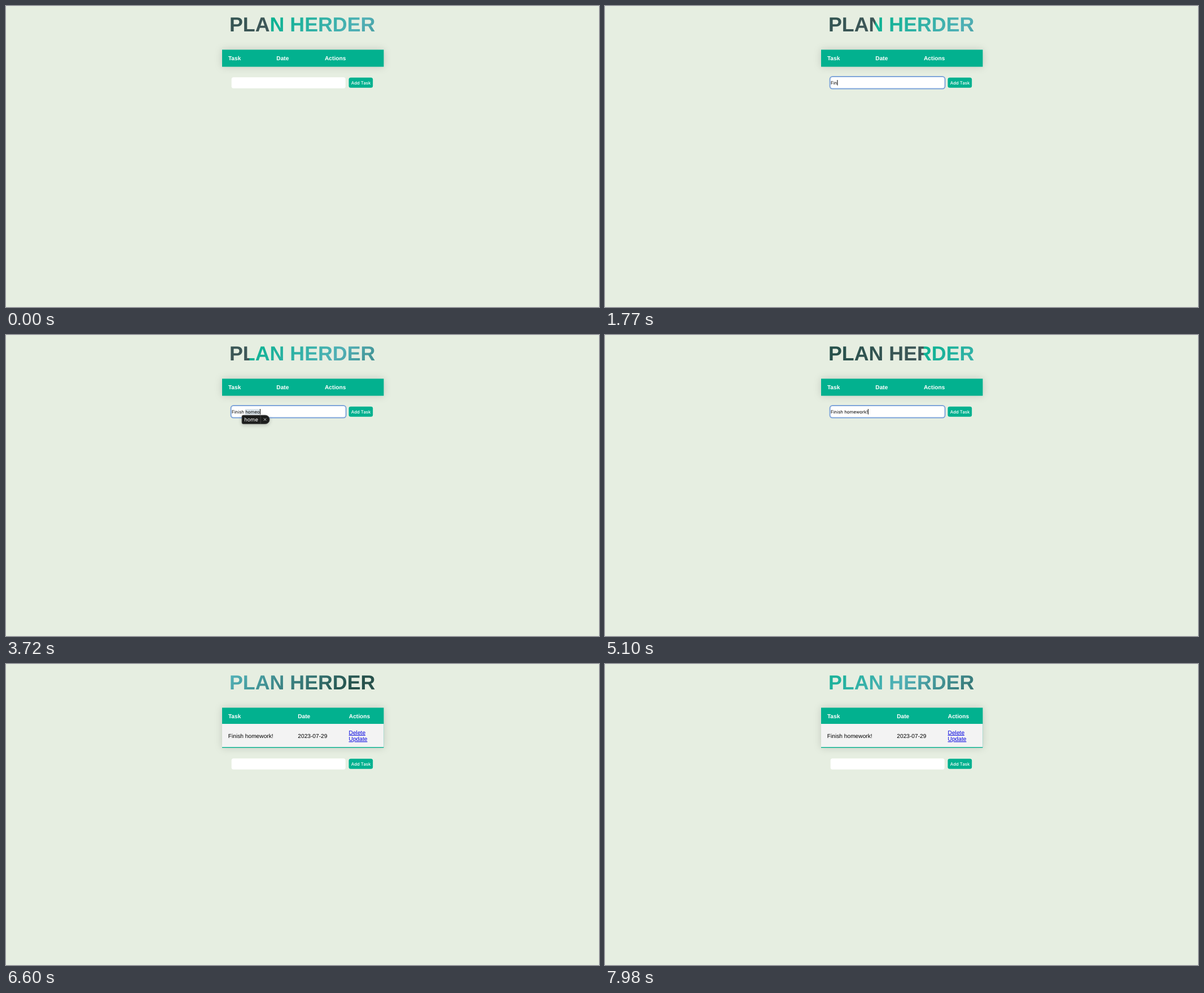
Write an HTML page that moves like this. It is 1051 px wide and 533 px high and loops after 8000 ms.

```html
<!DOCTYPE html>
<html lang="en">
<head>
<meta charset="utf-8">
<title>Plan Herder</title>
<style>
  :root { --green: #02b18f; }
  html, body { margin: 0; width: 100%; height: 100%; overflow: hidden; background: #e6eee1; }
  h1 {
    position: absolute; left: 383px; top: 13px; width: 286px; height: 41px;
    box-sizing: border-box; margin: 0; padding-left: 12.9px;
    font: bold 35.8px/41px "Liberation Sans", Arial, sans-serif;
    white-space: nowrap; text-rendering: geometricPrecision; color: transparent;
    background: linear-gradient(135deg, #04b38f 0%, #50b0b6 29%, #24504a 67%, #42585a 100%) 0 0 / 572px 100%;
    -webkit-background-clip: text; background-clip: text;
  }
  svg { position: absolute; left: 0; top: 0; }
  text { font: 10.2px "Liberation Sans", Arial, sans-serif; text-rendering: geometricPrecision; white-space: pre; }
  #card { fill: var(--green); filter: drop-shadow(0 0 7.15px rgba(0, 0, 0, .15)); }
  .head text { font-weight: bold; fill: #fff; }
  .link { fill: #0000e0; text-decoration: underline; }
  #form text { font: 7.9px Inter, sans-serif; }
  #form .label { font-size: 7.8px; font-weight: 500; fill: #fff; }
  #popup text { font: 9.3px Inter, sans-serif; fill: #fff; }
  #popup { filter: drop-shadow(0 2px 3px rgba(0, 0, 0, .2)); }
</style>
</head>
<body>
<h1 id="title">PLAN HERDER</h1>
<svg width="1051" height="533" viewBox="0 0 1051 533">
  <rect id="card" x="383" y="77.4" width="286.5"/>
  <g class="head">
    <text x="393.9" y="95.5">Task</text>
    <text id="date" y="95.5">Date</text>
    <text id="actions" y="95.5">Actions</text>
  </g>
  <g id="row">
    <rect x="383" y="106" width="286.5" height="41" fill="#f3f3f3"/>
    <text x="393.8" y="130.5">Finish homework!</text>
    <text x="517.3" y="130.5">2023-07-29</text>
    <text class="link" x="607.6" y="124.8">Delete</text>
    <text class="link" x="607.6" y="136.2">Update</text>
  </g>
  <g id="form">
    <rect x="399.7" y="126.3" width="202" height="19.4" rx="3.5" fill="#fff"/>
    <rect id="ring" x="398.6" y="125.1" width="204" height="21.5" rx="4.5" fill="#fff" stroke="#7fa5da" stroke-width="2"/>
    <rect id="mark" x="424" y="131" width="26.5" height="10" fill="#dbe5ec"/>
    <text id="typed" x="400" y="138.9"></text>
    <rect id="caret" y="131" width="1" height="9.6"/>
    <rect x="607.5" y="126.7" width="42.7" height="18" rx="3.5" fill="var(--green)"/>
    <text class="label" x="611.7" y="138.8">Add Task</text>
  </g>
  <g id="popup">
    <path d="M420.5 142H459.5a7.7 7.7 0 0 1 0 15.4H420.5a2.5 2.5 0 0 1-2.5-2.5V144.5a2.5 2.5 0 0 1 2.5-2.5Z" fill="#1d1e1d" stroke="#555" stroke-width=".7"/>
    <path d="M451.2 142.4V157" stroke="#4a4b4a" stroke-width=".8"/>
    <path d="M456.8 147.4l4.4 4.4m0-4.4l-4.4 4.4" stroke="#ddd" stroke-width=".9"/>
    <text x="422.2" y="152.8">home</text>
  </g>
</svg>
<script>
  const LOOP = 8000, STEP = 30, CYCLE = 1800, TILE = 572;
  const FOCUS = 450, RELOAD = 6120, START_PHASE = 1528, BLINK = 450;
  const HINT_ON = 3660, HINT_OFF = 3900;

  // Keystrokes in order; "<" is backspace.
  const KEYS = "Finish homeo<work!";
  const TIMES = [1410, 1560, 1710, 1980, 2190, 2400, 2640, 2850, 3090,
                 3240, 3420, 3600, 3900, 4080, 4230, 4380, 4530, 4920];

  const el = id => document.getElementById(id);
  const [title, card, date, actions, row, form, ring, mark, typed, caret, popup] =
    ["title", "card", "date", "actions", "row", "form", "ring", "mark", "typed", "caret", "popup"].map(el);
  const show = (node, on) => { node.style.display = on ? "" : "none"; };

  const type = keys => [...keys].reduce((s, k) => k === "<" ? s.slice(0, -1) : s + k, "");

  function draw(now) {
    const t = Math.floor((now % LOOP + 1) / STEP) * STEP;
    const done = t >= RELOAD;
    const focus = t >= FOCUS && !done;

    const age = done ? t - RELOAD : t + START_PHASE;
    title.style.backgroundPositionX = -(age % CYCLE) / CYCLE * TILE + "px";

    card.setAttribute("height", done ? 71 : 30.2);
    show(row, done);
    date.setAttribute("x", done ? 517.2 : 479.3);
    actions.setAttribute("x", done ? 607.8 : 565);
    form.setAttribute("transform", `translate(0 ${done ? 41 : 0})`);

    const pressed = TIMES.filter(time => time <= t);
    typed.textContent = focus ? type(KEYS.slice(0, pressed.length)) : "";

    const idle = t - (pressed.at(-1) ?? FOCUS);
    show(ring, focus);
    show(caret, focus && Math.floor(idle / BLINK) % 2 === 0);
    caret.setAttribute("x", 400.2 + typed.getComputedTextLength());

    const hint = t >= HINT_ON && t < HINT_OFF;
    show(mark, hint);
    show(popup, hint);
  }

  function tick(now) {
    draw(now);
    requestAnimationFrame(tick);
  }
  draw(0);
  requestAnimationFrame(tick);
</script>
</body>
</html>
```
